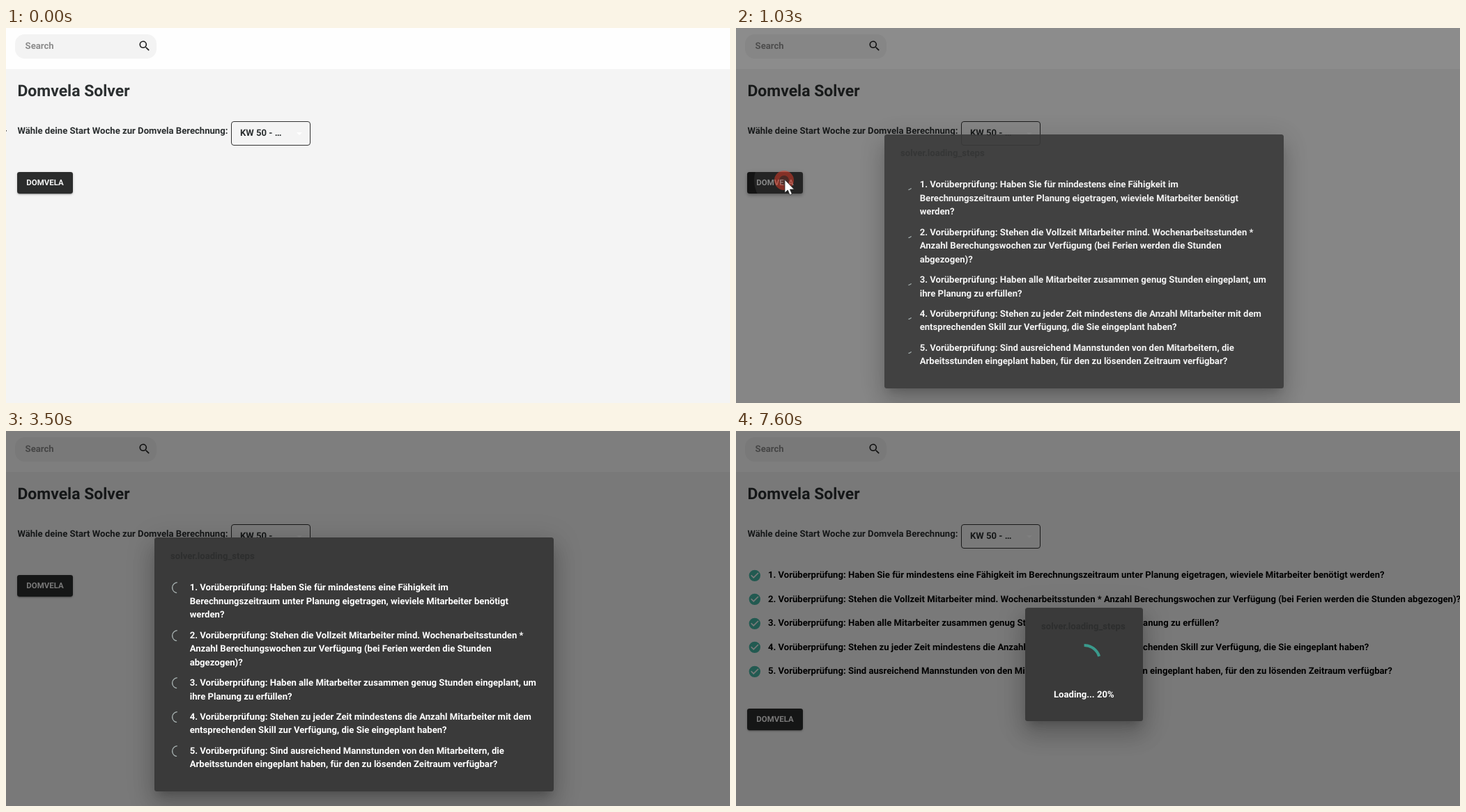
These frames come from a looping animation (1039 px wide and 539 px high, 8 s). An HTML page:

```html
<!DOCTYPE html>
<html lang="de">
<head>
<meta charset="utf-8">
<title>Domvela Solver</title>
<style>
html, body { margin: 0; width: 100%; height: 100%; overflow: hidden; }
#stage {
  position: relative; width: 1039px; height: 539px; overflow: hidden; background: #f4f4f4; color: #2b2f30;
  font: bold 13.12px/0 Roboto, sans-serif; text-rendering: geometricPrecision;
}
#stage div, #stage svg, #stage span { position: absolute; box-sizing: border-box; }
#stage span { white-space: pre; }
.layer { inset: 0; }
.header { width: 1039px; height: 59px; background: #fefefe; }
.search { left: 13px; top: 9px; width: 203px; height: 35px; border-radius: 14px; background: #f3f3f3; }
.select { left: 322.6px; top: 134px; width: 114.8px; height: 35px; border: 1px solid #333; border-radius: 4px; }
.arrow { left: 417px; top: 150px; border: 4px solid transparent; border-top-color: #fff; }
#button, #shadow { left: 16.4px; width: 79.2px; height: 31px; border-radius: 3.3px; }
#button {
  overflow: hidden; background: #2b2c2c; color: #f4f4f4;
  font-size: 11.48px; line-height: 31px; text-align: center;
}
#shadow { box-shadow: 0 2.5px 1px -1.6px #0003, 0 1.6px 1.6px #0002, 0 1px 4px #0002; }
#shadow.hover { box-shadow: 0 1.6px 3.3px -1px #0003, 0 3.3px 4px #0002, 0 1px 8px #0002; }
#ripple, #click { border-radius: 50%; transform: translate(-50%, -50%); }
#ripple { left: 52px; top: 12px; background: #fff; }
#click { left: 69px; top: 219px; border: 7px solid #dc3c28; background: #dc3c2866; }
#shade { background: #000; }
.dialog {
  border-radius: 3.5px; background: #3a3a3a;
  box-shadow: 0 9px 12px -6px #0003, 0 20px 31px 2.5px #00000024, 0 7px 38px 6.5px #0000001f;
}
</style>
</head>
<body>
<div id="stage"></div>
<script>
const stage = document.getElementById('stage');
const checks = [
  ['Haben Sie für mindestens eine Fähigkeit im', 'Berechnungszeitraum unter Planung eigetragen, wieviele Mitarbeiter benötigt', 'werden?'],
  ['Stehen die Vollzeit Mitarbeiter mind. Wochenarbeitsstunden *', 'Anzahl Berechungswochen zur Verfügung (bei Ferien werden die Stunden', 'abgezogen)?'],
  ['Haben alle Mitarbeiter zusammen genug Stunden eingeplant, um', 'ihre Planung zu erfüllen?'],
  ['Stehen zu jeder Zeit mindestens die Anzahl Mitarbeiter mit dem', 'entsprechenden Skill zur Verfügung, die Sie eingeplant haben?'],
  ['Sind ausreichend Mannstunden von den Mitarbeitern, die', 'Arbeitsstunden eingeplant haben, für den zu lösenden Zeitraum verfügbar?'],
].map(([first, ...rest], i) => [`${i + 1}. Vorüberprüfung: ${first}`, ...rest]);
const dialogRows = [225.4, 294, 362.5, 411.2, 460];
const pageRow = i => 207.7 + 34.5 * i;

// y is the vertical middle of the line
const text = (x, y, content, style = '') =>
  `<span style="left:${x}px;top:${y}px;${style}">${content}</span>`;
const icon = (cx, cy, color, path) =>
  `<svg style="left:${cx - 9.84}px;top:${cy - 9.84}px" width="19.68" height="19.68" viewBox="0 0 24 24"><path fill="${color}" d="${path}"/></svg>`;
const checkIcon = (cx, cy, color) => icon(cx, cy, color,
  'M12 2a10 10 0 1 0 0 20a10 10 0 1 0 0-20zM10 17l-5-5 1.41-1.41L10 14.17l7.59-7.59L19 8z');
const arc = (name, cx, cy, size, color) =>
  `<svg class="${name}" style="left:${cx - size / 2}px;top:${cy - size / 2}px" width="${size}" height="${size}" viewBox="-22 -22 44 44"><circle r="20.2" fill="none" stroke="${color}" stroke-width="3.6"/></svg>`;
const dialog = (x, y, w, h) =>
  `<div class="dialog" style="left:${x}px;top:${y}px;width:${w}px;height:${h}px"></div>` +
  text(x + 23, y + 27.5, 'solver.loading_steps', 'color:#2d2e2e');

stage.innerHTML = `
  <div class="header"></div>
  <div class="search"></div>
  ${text(27.6, 27, 'Search', 'color:#8c8c8c')}
  ${icon(198.4, 26.3, '#222', 'M15.5 14h-.79l-.28-.27A6.5 6.5 0 1 0 13.73 14.43l.27.28v.79l5 4.99L20.49 19zM9.5 14a4.5 4.5 0 1 1 0-9a4.5 4.5 0 1 1 0 9z')}
  ${text(16.4, 91, 'Domvela Solver', 'font-size:22.96px')}
  ${text(16.4, 149.4, 'Wähle deine Start Woche zur Domvela Berechnung:')}
  <div class="select"></div><div class="arrow"></div>
  ${text(336, 151.8, 'KW 50 - …')}
  <div id="list" class="layer" style="color:#000">
    ${checks.map((lines, i) => checkIcon(26.4, pageRow(i), '#45b5a3') + text(45.9, pageRow(i) + .6, lines.join(' '))).join('')}
  </div>
  <div id="shadow"></div>
  <div id="button">DOMVELA<div id="ripple"></div></div>
  <div id="shade" class="layer"></div>
  <div id="steps" class="layer" style="color:#fff">
    ${dialog(213, 153, 573, 365)}
    <div id="lines" class="layer">
      ${checks.map((lines, i) => lines.map((line, k) => text(263.7, dialogRows[i] + .6 + 19.6 * k, line)).join('')).join('')}
    </div>
    <div id="spinners" class="layer">${dialogRows.map(y => arc('spinner', 245.8, y, 16.4, '#a9b4b3')).join('')}</div>
    <div id="done" class="layer">${dialogRows.map(y => checkIcon(245.8, y, '#3d9a8b')).join('')}</div>
  </div>
  <div id="loading" class="layer" style="color:#fff">
    ${dialog(415, 254, 169, 163)}
    ${arc('progress', 499.5, 330.6, 49.2, '#3a9a8c')}
    ${text(456, 379.5, 'Loading... <b id="percent"></b>%')}
  </div>
  <div id="click"></div>
  <svg id="cursor" style="left:0;top:0;overflow:visible" width="16" height="25">
    <path d="M0 0V19L4.3 15 7.2 22 10.4 20.6 7.5 14H13.5Z" fill="#fff" stroke="#222" stroke-width=".8"/>
  </svg>`;

const el = Object.fromEntries([...stage.querySelectorAll('[id]')].map(node => [node.id, node]));
const spinnerArcs = stage.querySelectorAll('.spinner circle');
const progressArc = stage.querySelector('.progress circle');
const ROUND = 2 * Math.PI * 20.2;

const ramp = (t, from, to) => Math.min(1, Math.max(0, (t - from) / (to - from)));
const easeOut = u => 1 - (1 - u) ** 3;
const smooth = u => u * u * (3 - 2 * u);
const show = (node, visible) => { node.style.display = visible ? '' : 'none'; };
const disc = (node, radius, opacity) => {
  node.style.width = node.style.height = 2 * radius + 'px';
  node.style.opacity = opacity;
};

function spin(t) {
  const turns = Math.max(0, t - 868) / 1500;
  const phase = turns % 1;
  const grow = smooth(ramp(phase, 0, .5));
  const shrink = smooth(ramp(phase, .5, 1));
  for (const circle of spinnerArcs) {
    circle.setAttribute('transform', `rotate(${360 * phase})`);
    circle.setAttribute('stroke-dasharray', `${1 + 99 * grow} 200`);
    circle.setAttribute('stroke-dashoffset', -15 * grow - 110 * shrink);
  }
}

function draw(time) {
  const t = Math.floor((time - 50) / 70) * 70 + 50;
  const solving = time >= 6200;
  const checked = time >= 4220;
  const fade = easeOut(ramp(t, 909, 1134));

  const move = smooth(ramp(t, 0, 480));
  el.cursor.style.transform = `translate(${-12.5 + 82.5 * move}px, ${134 + 84 * move}px)`;
  show(el.cursor, time < 1590);

  const hover = t >= 340 && time < 1590;
  el.button.style.top = el.shadow.style.top = (solving ? 399.4 : 207.4) + 'px';
  el.button.style.background = hover ? '#242525' : '#2b2c2c';
  el.shadow.className = hover ? 'hover' : '';
  disc(el.ripple, 70 * ramp(t, 785, 1193), .19 * (1 - ramp(t, 960, 1200)));
  disc(el.click, 7 + 7 * ramp(t, 820, 1030), t < 820 ? 0 : .75 * (1 - ramp(t, 960, 1200)));

  el.shade.style.opacity = .5 * fade;
  el.steps.style.opacity = fade;
  show(el.steps, !solving);
  show(el.spinners, !checked);
  show(el.done, checked);
  el.lines.style.transform = checked ? 'translateX(.6px)' : '';
  spin(t);

  show(el.list, solving);
  show(el.loading, solving);
  const share = .1 + .1 * easeOut(ramp(time, 7220, 7600));
  progressArc.setAttribute('transform', 'rotate(-90)');
  progressArc.setAttribute('stroke-dasharray', `${share * ROUND} ${ROUND}`);
  el.percent.textContent = time < 7260 ? 10 : 20;
}

const start = performance.now();
function tick() {
  draw((performance.now() - start) % 8000);
  requestAnimationFrame(tick);
}
tick();
</script>
</body>
</html>
```
